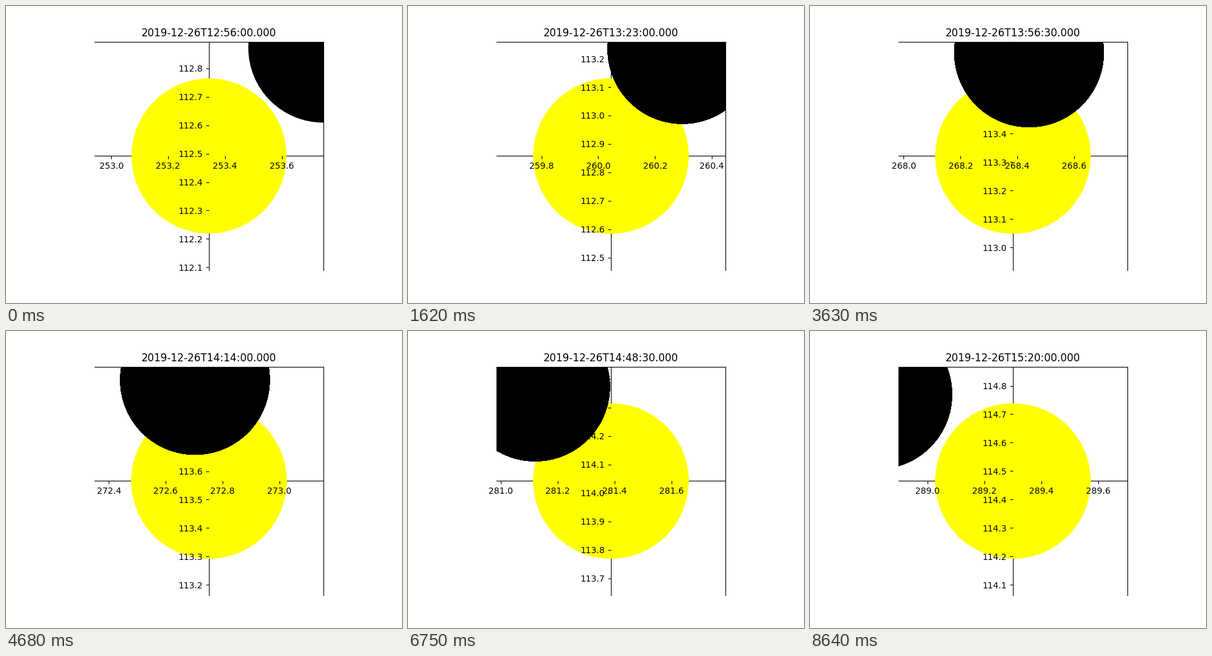
A matplotlib script for the animation above (8.67 s loop, 640 px wide and 480 px high).

```python
import numpy as np
import matplotlib.pyplot as plt
from matplotlib.animation import FuncAnimation
from matplotlib.patches import Circle
from matplotlib.ticker import FormatStrFormatter, MultipleLocator

FRAMES, INTERVAL = 289, 30
START = (12 * 60 + 56) * 60   # seconds of the day
STEP = 30                     # seconds per frame
HALF_VIEW = 0.4023            # degrees
SUN_R, MOON_R = 0.2725, 0.2632
COLATITUDE = np.radians(3.2)
LAYERS = 24                   # overdrawn discs harden the edges over time


def sun_position(k):
    """Azimuth and zenith angle in degrees from hour angle and declination."""
    hour = np.radians(74.6451 + 0.124964 * k)
    dec = np.radians(-23.3743 + 8e-6 * k)
    sin_c, cos_c = np.sin(COLATITUDE), np.cos(COLATITUDE)
    azimuth = np.arctan2(np.sin(hour),
                         np.cos(hour) * cos_c - np.tan(dec) * sin_c)
    zenith = np.arccos(cos_c * np.sin(dec)
                       + sin_c * np.cos(dec) * np.cos(hour))
    return 180 + np.degrees(azimuth), np.degrees(zenith)


def moon_offset(k):
    """The moon drifts past the sun, slowly gaining speed."""
    t = k / (FRAMES - 1)
    dx = 0.4016 - 0.7875 * t - 0.0722 * t**2 - 0.0192 * t**3
    dy = 0.3807 - 0.0113 * t - 0.0646 * t**2
    return dx, dy


def clock(seconds):
    minutes, s = divmod(seconds, 60)
    h, m = divmod(minutes, 60)
    return f"2019-12-26T{h:02d}:{m:02d}:{s:02d}.000"


plt.rcParams["font.family"] = "DejaVu Sans"
fig = plt.figure(figsize=(6.4, 4.8), dpi=100)
ax = fig.add_axes([0.125, 0.11, 0.775, 0.77])
ax.set_aspect("equal")

for side in ("left", "bottom"):
    ax.spines[side].set_position("center")
for spine in ax.spines.values():
    spine.set_zorder(0.5)
for axis, step in ((ax.xaxis, 0.2), (ax.yaxis, 0.1)):
    axis.set_major_locator(MultipleLocator(step))
    axis.set_major_formatter(FormatStrFormatter("%.1f"))
    axis.set_zorder(2)

title = ax.set_title("", fontsize=12, y=1)


def disc_stack(radius, color, zorder):
    return [ax.add_patch(Circle((0, 0), radius, fc=color, lw=0, zorder=zorder))
            for _ in range(LAYERS)]


suns = disc_stack(SUN_R, "yellow", 1)
moons = disc_stack(MOON_R, "black", 3)


def place(stack, center, count):
    for i, disc in enumerate(stack):
        disc.set_center(center)
        disc.set_visible(i < count)


def update(k):
    x, y = sun_position(k)
    dx, dy = moon_offset(k)
    ax.set_xlim(x - HALF_VIEW, x + HALF_VIEW)
    ax.set_ylim(y - HALF_VIEW, y + HALF_VIEW)
    place(suns, (x, y), k + 1)
    place(moons, (x + dx, y + dy), k + 1)
    title.set_text(clock(START + STEP * k))


anim = FuncAnimation(fig, update, frames=FRAMES, init_func=lambda: update(0),
                     interval=INTERVAL, repeat=True, repeat_delay=0)
plt.show()
```
